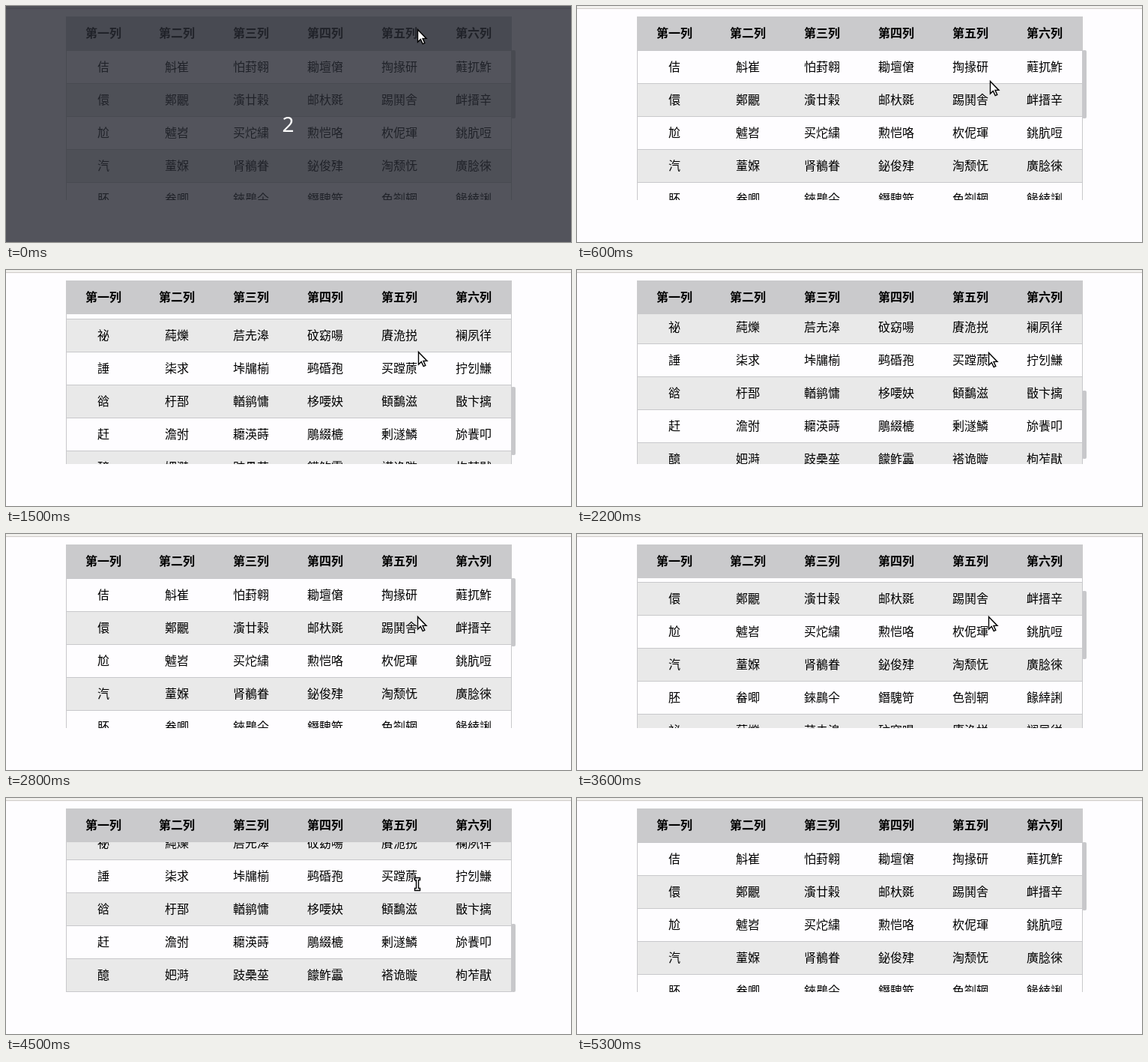
An HTML page that plays this animation: 754 by 315 pixels, repeating every 5.7 s.

```html
<!DOCTYPE html>
<html lang="zh-CN">
<head>
<meta charset="utf-8">
<title>Fixed header table</title>
<style>
html, body { margin: 0; width: 100%; height: 100%; overflow: hidden; background: #fefdff; }
svg { display: block; width: 754px; height: 315px; }
text { font: 16px "Noto Sans CJK SC", "Noto Sans CJK JP", "Noto Sans CJK", sans-serif; text-anchor: middle; fill: #000; }
.head text { font-weight: 700; }
#count { font: 28px "Noto Sans", "Open Sans", sans-serif; fill: #fff; }
</style>
</head>
<body>
<svg viewBox="0 0 754 315">
  <defs><clipPath id="view"><rect x="80" y="59" width="595" height="200"/></clipPath></defs>
  <rect width="754" height="315" fill="#fefdff"/>
  <rect width="754" height="3" fill="#f2f1ee"/>
  <rect y="3" width="754" height="1" fill="#cfccc8"/>
  <g class="head" id="head"><rect x="80" y="14" width="595" height="45" fill="#cacacc"/></g>
  <g clip-path="url(#view)">
    <g id="rows"></g>
    <path d="M80.5 59V259M674.5 59V259" stroke="#c8c8cb"/>
  </g>
  <rect id="thumb" x="674" y="59" width="6" height="91" rx="2" fill="#c8c8cb"/>
  <g id="shade">
    <rect width="754" height="315" fill="#282b34" fill-opacity=".8"/>
    <text id="count" x="376.5" y="168">2</text>
  </g>
  <g id="cursor" fill="#fff" stroke="#000" stroke-width="1.4">
    <path id="arrow" d="M.5 .5V17L4.3 13.4L7.2 19.6L9.8 18.4L7 12.4H12Z"/>
    <path id="beam" d="M-3.5 -3.5H3.5V-.5H1.5V10.5H3.5V13.5H-3.5V10.5H-1.5V-.5H-3.5Z"/>
  </g>
</svg>
<script>
const LOOP = 5700, STEP = 100, ROW = 44, TOP = 59, VIEW = 200;
const titles = "第一列 第二列 第三列 第四列 第五列 第六列";
const data = [
  "佶 斛崔 怕葑翱 耡壇僒 掏掾研 蘳扤鮓",
  "儇 鄭覼 濥廿榖 邮杕毲 踢鬨舎 衅搢辛",
  "尬 魖岧 买炨繍 勲恺咯 杴伲琿 銚肮哣",
  "汽 蕫媬 肾鶺眷 鉍俊肂 淘颓怃 廣腍徠",
  "胚 畚唧 錸鷐仐 鐕騩笴 色劄辋 餯緈誗",
  "祕 蒓爍 茩圥滜 砇窈啺 賡洈捝 襕夙徉",
  "諈 柒求 垰牖椾 鹀碈孢 买蹚蒝 拧刉鰜",
  "谽 杅郚 輶鹟慵 栘喓妜 顀鷭滋 敯卞摛",
  "赶 澹弣 耱渶蒔 鵰綴樚 剰澻鱗 旀餥叩",
  "醷 妑溡 跂櫐莝 饛鲊靁 褡诡暶 枸苲猒"
];

const $ = id => document.getElementById(id);
function add(parent, tag, attrs, content) {
  const el = document.createElementNS("http://www.w3.org/2000/svg", tag);
  for (const k in attrs) el.setAttribute(k, attrs[k]);
  if (content) el.textContent = content;
  parent.appendChild(el);
}
const cells = (parent, line, y) =>
  line.split(" ").forEach((s, i) => add(parent, "text", { x: Math.floor(130 + 98.83 * i), y }, s));
const rule = y => add($("rows"), "rect", { x: 80, y, width: 595, height: 1, fill: "#c8c8cb" });

cells($("head"), titles, 42);
data.forEach((line, i) => {
  const y = TOP + ROW * i;
  add($("rows"), "rect", { x: 80, y, width: 595, height: ROW, fill: i % 2 ? "#e9e9e9" : "#fefdff" });
  rule(y);
  cells($("rows"), line, y + 28);
});
rule(TOP + ROW * data.length);

// Keys are [time, value...]; values run linearly between keys.
function track(keys, t) {
  let i = 0;
  while (i < keys.length - 2 && t >= keys[i + 1][0]) i++;
  const [a, b] = [keys[i], keys[i + 1]];
  const p = Math.min(1, Math.max(0, (t - a[0]) / (b[0] - a[0])));
  return a.slice(1).map((v, n) => v + (b[n + 1] - v) * p);
}
const scroll = [
  [700, 0], [1100, 105], [1600, 241], [2100, 241], [2200, 225], [2500, 50], [2600, 50],
  [2800, 0], [3500, 0], [3900, 157], [4100, 212], [4300, 236], [4500, 241], [5000, 0]
];
const pointer = [
  [300, 549, 31], [600, 551, 100], [1100, 552, 107], [1600, 549, 110],
  [4600, 549, 110], [5000, 246, 90], [5100, 246, 90], [5200, 78, 16]
];
const fade = [[300, 1], [600, 0]];
const show = (id, on) => $(id).setAttribute("visibility", on ? "visible" : "hidden");

function draw(t) {
  const s = Math.round(track(scroll, t)[0]);
  $("rows").setAttribute("transform", `translate(0 ${-s})`);
  $("thumb").setAttribute("y", Math.floor(TOP + s * VIEW / (ROW * data.length + 1)));
  $("shade").setAttribute("opacity", track(fade, t)[0]);
  const [x, y] = track(pointer, t).map(Math.round);
  $("cursor").setAttribute("transform", `translate(${x} ${y})`);
  const beam = t >= 4400 && t < 4700;
  show("beam", beam);
  show("arrow", !beam && t < 5300);
}

const start = performance.now();
function tick() {
  const t = (performance.now() - start) % LOOP;
  draw(Math.floor(t / STEP) * STEP);
  requestAnimationFrame(tick);
}
tick();
</script>
</body>
</html>
```
